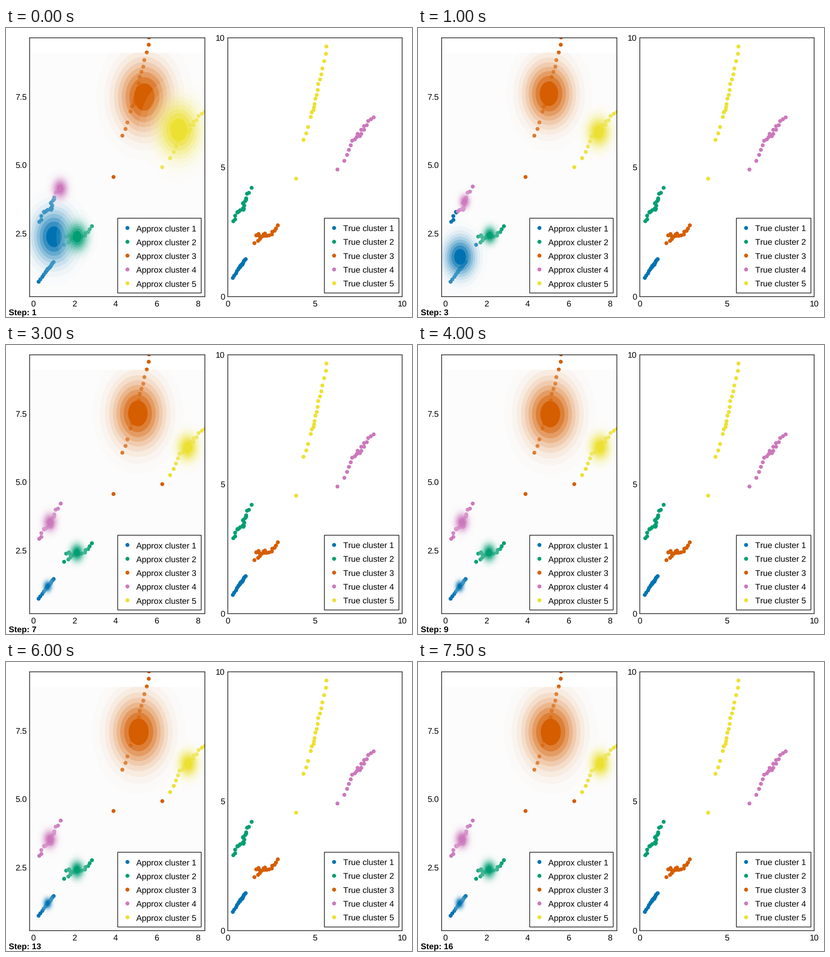
Animation, 885 px wide and 632 px high, one loop 8 s. Source, as a matplotlib script:

```python
import numpy as np
import matplotlib.pyplot as plt
from matplotlib.animation import FuncAnimation
from matplotlib.colors import to_rgb
from matplotlib.patches import Rectangle

W, H, DPI = 885, 632, 100
PX = 72 / DPI
LINE = 1.35 * PX
STEPS = 16
COLORS = np.array([to_rgb(c) for c in
                   ("#0173b2", "#029e73", "#d55e00", "#cc78bc", "#ece133")])
plt.rcParams.update({"font.family": "Liberation Sans", "font.size": 18.2 * PX,
                     "axes.linewidth": LINE, "text.hinting": "none",
                     "text.kerning_factor": 6})
rng = np.random.default_rng(4)


def scatter_along(path, n, jitter, stray=None):
    """Spread n points along a path of key points, plus one stray point."""
    keys = np.array(path)
    at, u = np.linspace(0, 1, n), np.linspace(0, 1, len(keys))
    xy = np.transpose([np.interp(at, u, axis) for axis in keys.T])
    xy[1:-1] += rng.normal(0, jitter, (n - 2, 2))
    return xy if stray is None else np.vstack([stray, xy])


TRUE = [
    scatter_along([(.27, .73), (.60, 1.06), (.70, 1.17), (.77, 1.23), (.86, 1.31),
                   (1.0, 1.45)], 20, .006),
    scatter_along([(.30, 2.92), (.50, 3.25), (.72, 3.36), (.95, 3.42), (.90, 3.62),
                   (1.03, 3.8), (1.345, 4.21)], 19, .04),
    scatter_along([(1.51, 2.08), (1.8, 2.4), (2.05, 2.3), (2.2, 2.45), (2.5, 2.4),
                   (2.86, 2.76)], 18, .06),
    scatter_along([(6.66, 5.25), (7.12, 5.92), (7.43, 6.25), (7.6, 6.3), (7.82, 6.6),
                   (8.35, 6.94)], 18, .04, stray=(6.28, 4.92)),
    scatter_along([(4.34, 6.07), (4.8, 7.03), (4.97, 7.42), (5.12, 8.05), (5.4, 8.73),
                   (5.635, 9.665)], 18, .03, stray=(3.91, 4.56)),
]
DATA = np.concatenate(TRUE)

# Mean x, mean y and sigma of each round Gaussian at step 1
START = np.array([(1.015, 2.358, .825), (2.14, 2.358, .47), (5.41, 7.467, 1.09),
                  (1.315, 4.12, .34), (7.08, 6.27, .90)])
BAND_RADII = np.sqrt(-2 * np.log(np.arange(1, 10) / 10))
DENSITY_TOP = 9.09


def sq_dist(fit):
    return ((DATA[:, None] - fit[:, :2]) ** 2).sum(2)


def log_density(fit):
    return -sq_dist(fit) / (2 * fit[:, 2] ** 2) - 2 * np.log(fit[:, 2])


def em_step(fit):
    """One expectation-maximisation step with equal cluster weights."""
    logp = log_density(fit)
    resp = np.exp(logp - logp.max(1, keepdims=True))
    resp /= resp.sum(1, keepdims=True)
    total = resp.sum(0)
    new = fit.copy()
    new[:, :2] = resp.T @ DATA / total[:, None]
    new[:, 2] = np.sqrt((resp * sq_dist(new)).sum(0) / (2 * total))
    return new


# Points are coloured by the fit before the one on show
before = START.copy()
before[[1, 3], :2] += [(.36, 0), (.19, .68)]
FITS = [before, START]
while len(FITS) <= STEPS:
    FITS.append(em_step(FITS[-1]))


def point_colors(step):
    return COLORS[log_density(FITS[step - 1]).argmax(1)]


def to_x(px):
    return (px - 59) / 44.85


def to_y(py):
    return (598.5 - py) / 59.8


GX, GY = np.meshgrid(to_x(np.arange(51, 434) + .5), to_y(np.arange(21, 588) + .5))


def density(step):
    """Blend the banded Gaussians, each fading from clear white to its colour."""
    rgb = np.zeros(GX.shape + (3,))
    alpha = np.zeros(GX.shape + (1,))
    for (x, y, sigma), color in zip(FITS[step], COLORS):
        r = np.hypot(GX - x, GY - y)
        t = sum(np.clip((sigma * b - r) * 51 + .5, 0, 1) for b in BAND_RADII) / 9
        t = np.where(GY < DENSITY_TOP, t, 0)[..., None]
        rgb = (1 - t * (1 - color)) * t + rgb * (1 - t)
        alpha = t + alpha * (1 - t)
    return np.concatenate([np.clip(rgb / np.maximum(alpha, 1e-6), 0, 1), alpha], 2)


def panel(x0, x1, xlim, ylim, xticks, yticks, fmt):
    top, bottom = 21.5, 587.5
    ax = fig.add_axes([x0 / W, 1 - bottom / H, (x1 - x0) / W, (bottom - top) / H])
    ax.set(xlim=xlim, ylim=ylim)
    ax.set_xticks(xticks)
    ax.set_yticks(yticks, [fmt % v for v in yticks])
    ax.tick_params(length=0)
    ax.tick_params(axis="x", pad=8.5 * PX)
    ax.tick_params(axis="y", pad=6.5 * PX)
    for spine in ax.spines.values():
        spine.set_snap(False)
    return ax


def dots(ax, xy, colors, **kw):
    return ax.scatter(*np.transpose(xy), s=(8.6 * PX) ** 2, c=colors, lw=0, **kw)


def legend(x0, x1, name):
    over.add_patch(Rectangle((x0, 416), x1 - x0, 163.5, fc="white", ec="black",
                             lw=LINE, snap=False))
    rows = 437.3 + 30.25 * np.arange(5)
    dots(over, [(x0 + 21.2, y) for y in rows], COLORS, zorder=3)
    for i, y in enumerate(rows, 1):
        over.text(x0 + 41, y + 6.7, f"{name} cluster {i}")


fig = plt.figure(figsize=(W / DPI, H / DPI), dpi=DPI, facecolor="white")
xlim, ylim = to_x(np.array([51.5, 433.5])), to_y(np.array([587.5, 21.5]))
approx = panel(51.5, 433.5, xlim, ylim, [0, 2, 4, 6, 8], [2.5, 5, 7.5], "%.1f")
truth = panel(483.5, 863.5, (0, 10), (0, 10), [0, 5, 10], [0, 5, 10], "%d")
over = fig.add_axes([0, 0, 1, 1], zorder=5)
over.set(xlim=(0, W), ylim=(H, 0))
over.axis("off")

approx.axhspan(to_y(588), DENSITY_TOP, fc="#fcfcfc", lw=0, zorder=0)
points = dots(approx, DATA, point_colors(1), zorder=1)
bands = approx.imshow(density(1), extent=(to_x(51), to_x(434), to_y(588), to_y(21)),
                      aspect="auto", interpolation="nearest", zorder=2)
approx.set(xlim=xlim, ylim=ylim)
for group, color in zip(TRUE, COLORS):
    dots(truth, group, [color])
legend(243.5, 425.5, "Approx")
legend(694, 856.5, "True")
label = over.text(6.3, 628, "", weight="bold")


def update(i):
    step = i + 1
    points.set_facecolor(point_colors(step))
    bands.set_data(density(step))
    label.set_text(f"Step: {step}")
    return points, bands, label


anim = FuncAnimation(fig, update, frames=STEPS, interval=500, repeat=True,
                     repeat_delay=0)
plt.show()
```
